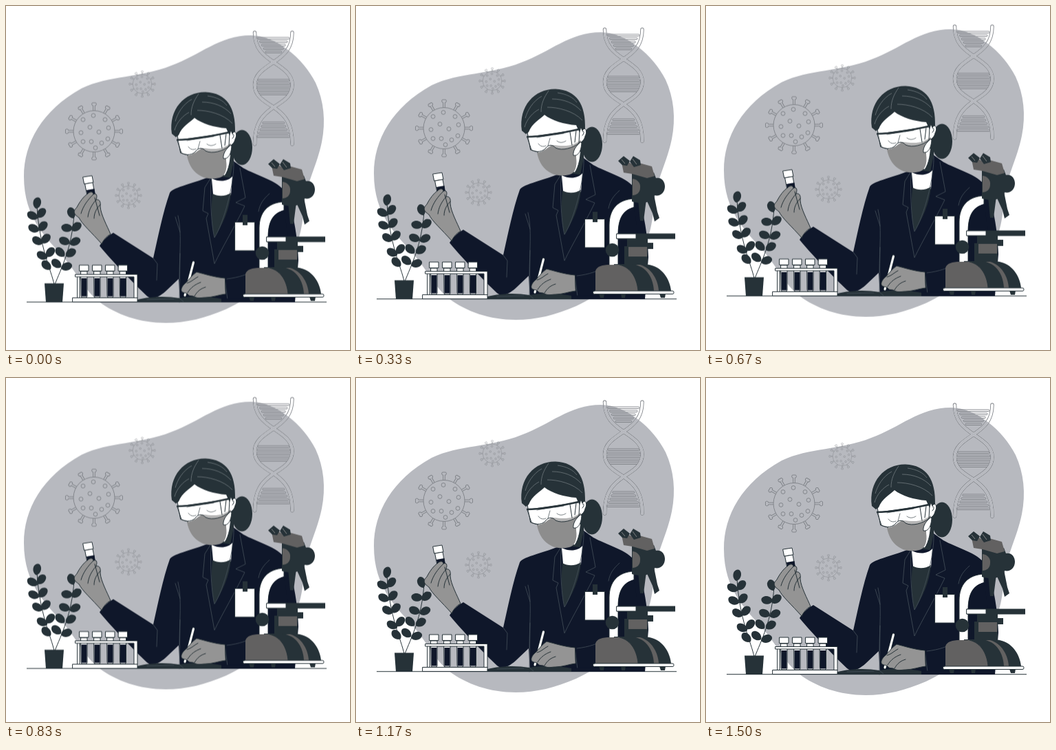
Animation of 500 by 500 pixels, one loop 1.54 s. Source, as an HTML page:

```html
<!DOCTYPE html>
<html lang="en">
<head>
<meta charset="utf-8">
<title>Laboratory</title>
<style>
  html, body { margin: 0; width: 100%; height: 100%; overflow: hidden; background: #fff; }
  svg { display: block; width: 100%; height: 100%; }
  #scene { animation: float 1540ms -5ms infinite; }
  /* Linear rise and fall of 10px, shown at 24 pictures a second */
  @keyframes float {
    0% { transform: translateY(-.4px); animation-timing-function: steps(17); }
    45.946% { transform: translateY(-9.83px); animation-timing-function: steps(1); }
    48.649% { transform: translateY(-9.61px); animation-timing-function: steps(17); }
    94.595% { transform: translateY(-.18px); animation-timing-function: steps(1); }
    97.297%, 100% { transform: translateY(0); }
  }
  .navy { fill: #0f172a; }
  .dark { fill: #263238; }
  .grey { fill: #949494; }
  .iron { fill: #626161; }
  .white { fill: #fff; }
  .ink { stroke: #263238; stroke-width: 1; stroke-linejoin: round; stroke-linecap: round; }
  .none { fill: none; }
  .seam { fill: none; stroke: #46515b; stroke-width: .8; stroke-linecap: round; stroke-linejoin: round; }
  .faint { fill: none; stroke: #7d8086; stroke-width: .9; }
  .faint * { vector-effect: non-scaling-stroke; }
  .strand { fill: none; stroke-linecap: round; }
</style>
</head>
<body>
<svg viewBox="0 0 500 500" preserveAspectRatio="none">
  <defs>
    <path id="blob" d="M26 248C26 200 52 152 110 120C150 101 195 105 240 87C282 72 310 43 356 43C392 43 432 76 450 112C462 138 465 168 459 198C452 232 438 255 434 285C431 310 431 335 415 360C395 395 355 425 320 441C290 454 262 461 232 461C195 461 160 449 135 430C115 414 104 390 85 367C60 338 26 310 26 248Z"/>
    <clipPath id="inside"><use href="#blob"/></clipPath>
    <g id="helix">
      <path d="M361.5 39C361.5 62 374 72 389 82C404 92 416 100 416 115C416 131 404 138 389 147.500C372 159 361.500 171 361.500 201"/>
      <path d="M416 39C416 62 404 72 389 82C374 92 361.500 100 361.500 115C361.500 131 374 138 389 147.500C406 159 416 171 416 201"/>
    </g>
    <path id="leaf" d="M0 0C2-5 8-7 13-5C18-2 18 3 13 5C8 7 2 5 0 0Z"/>
    <g id="virus"></g>
    <g id="tube">
      <path class="white ink" d="M2 386h9v36q0 2-2 2h-5q-2 0-2-2z"/>
      <path class="navy" d="M2.500 396h8v26.500h-8z"/>
      <path class="white ink" d="M0 377h13v8.500h-13z"/>
    </g>
  </defs>

  <g id="scene">
    <use href="#blob" fill="#b7b9bf"/>

    <g id="dna">
      <g id="rungs" class="faint"></g>
      <use href="#helix" class="strand" stroke="#7d8086" stroke-width="5.400"/>
      <use href="#helix" class="strand" stroke="#fff" stroke-width="3.700"/>
      <g clip-path="url(#inside)"><use href="#helix" class="strand" stroke="#b7b9bf" stroke-width="3.800"/></g>
    </g>

    <g class="faint">
      <use href="#virus" transform="translate(128 182.500)"/>
      <use href="#virus" transform="translate(198 113.800) scale(.46)"/>
      <use href="#virus" transform="translate(178 275.800) scale(.46)"/>
    </g>

    <g id="plant">
      <path class="none ink" d="M70 405C66 385 48 350 45 290M71 405C80 382 96 352 99 303"/>
      <g id="leaves" class="dark"></g>
      <path class="dark" d="M56 403.500H84L82 431H58Z"/>
    </g>

    <g id="woman">
      <ellipse class="dark" cx="343" cy="206" rx="15" ry="25.500"/>
      <path class="dark" d="M322 180L331 182V248C324 258 303 258 294 250Z"/>

      <path class="navy" d="M299 247C276 258 243 263 238 272C228 300 220 340 214 367L156 330C147 335 140 342 136 349C155 372 185 403 205 422C212 428 222 424 232 415L251 397L253 431H420L425 370C424 328 414 283 402 266C390 253 363 246 345 236L331 226L326 250Z"/>
      <path class="white" d="M299 251C311 257 323 255 329 248L327 275C318 278 307 278 301 274Z"/>
      <path class="dark" d="M300 273C309 278 319 277 327 272C325 296 314 320 303 337C298 318 298 292 300 273Z"/>
      <path class="seam" d="M299 248L289 264L286 298L294 302L291 309L303 375C315 350 333 320 347 291L334 286L348 279L340 236M331 228C332 257 317 315 303 337C298 318 296 270 299 248M252 397C252 360 256 330 250 305M252 431L253 360M214 367L220 375L219 399M383 273C374 281 369 288 367 299M246 307L253 329"/>

      <path class="white ink" d="M249 187C253 172 260 164 273 157L325 176L329 186C333 179 337 187 333 194C332 199 329 201 327 203C327 224 324 238 318 247L276 238L264 217L254 214Z"/>
      <path class="dark" d="M241 186C236 150 260 125 290 125.500C321 127 334 148 333 184L327 182L325 189L320 178C303 177 284 171 274 163C267 170 256 175 251 188L247 191Z"/>
      <path class="none" stroke="#7b8488" stroke-width=".7" d="M280 128C273 138 269 147 269 159M270 136C257 143 249 157 246 168M266 155C258 159 248 169 245 181M278 152C293 152 316 157 329 171M285 140C302 140 317 146 327 157M293 131C307 133 316 138 321 145"/>
      <path class="none ink" d="M329 187C332 186 332 190 329 193"/>

      <path class="none ink" d="M265 205C268 209 272 210 276 208M292 201C296 204 300 204 305 201M282 197L279 208M263 196L274 194M289 192L302 190"/>
      <path class="grey" style="fill:#8d8d8d" d="M263 218C274 217 279 209 286 207C297 208 307 209 316 206L327 200C328 212 319 216 320 225C322 239 318 248 310 250C302 252 291 252 284 248C272 242 266 232 263 218Z"/>
      <path class="white ink" d="M326 203C320 208 315 215 316 222C322 223 327 218 328 204Z" stroke-width=".6"/>
      <path class="ink" fill="#fff" fill-opacity=".35" d="M249 196L255 214C262 218 272 217 276 211C280 206 286 206 290 211C300 216 316 211 324 204L325 185Z"/>
      <path class="none" stroke="#263238" stroke-width="2.600" d="M248 195C273 195 302 189 326 183.500"/>
      <path class="none ink" d="M311 188L314 207M320 186L318 203"/>

      <path class="white ink" d="M112 249L125 247L127 257L114 259Z"/>
      <path class="white ink" d="M115 259L126 257L129 273L118 274Z"/>
      <path class="navy" d="M117 268L128.500 266L130 276L118 276Z"/>
      <path class="grey ink" stroke-width=".7" d="M139 346C124 329 111 318 106 308C97 302 98 298 103 293C107 285 113 277 119 273C123 269 127 271 127 274C132 272 133 276 131 282C136 281 138 285 137 292C138 304 147 320 152 332C146 335 142 340 139 346Z"/>
      <path class="none ink" d="M127 274C119 282 112 291 109 302M131 282C124 290 120 298 119 307M137 289C131 295 128 302 128 309M129 279L136 305"/>

      <path class="white ink" d="M333 314.500H361.500V356H333Z"/>
      <path class="dark" d="M344 304H351V319H344Z"/>

      <path class="dark" d="M184 429C203 423 229 421 252 425C279 420 307 424 340 431H184Z"/>
      <path class="seam" d="M252 425L258 430M205 427L244 426"/>
      <path class="navy" d="M317 397L350 389V431H317Z"/>
      <path class="seam" d="M318 397L322 427M321 397C339 395 353 390 361 384"/>
      <path class="none" stroke="#263238" stroke-width="4.500" stroke-linecap="round" d="M272.500 373L260 421"/>
      <path class="none" stroke="#fff" stroke-width="3" stroke-linecap="round" d="M272.500 373L260 421"/>
      <path class="grey ink" stroke-width=".7" d="M318 396C304 395 289 390 277 387C271 391 266 398 261 403C256 407 253 413 256 416C259 418 262 417 264 419C266 423 272 421 274 423C279 426 285 424 290 424C300 424 310 420 319 419Z"/>
      <path class="none ink" d="M263 403C269 402 273 397 279 394M264 417C269 409 275 405 283 402M274 422C278 415 283 411 290 409"/>
    </g>

    <g id="rack">
      <path class="white ink" d="M104 393H107V425H104Z"/>
      <use href="#tube" x="107"/><use href="#tube" x="126"/><use href="#tube" x="145"/><use href="#tube" x="163.500"/>
      <path class="white ink" d="M101 390.500H191V425H186V394H101Z"/>
      <path class="white ink" d="M97 424.500H191V430.500H97Z"/>
    </g>

    <path class="none" stroke="#263238" d="M30 430.700H466"/>

    <g id="microscope">
      <path class="navy" d="M313 425.500H420V431H313Z"/>
      <path class="white ink" d="M368 386V323C368 301 380 286 404 285V298C388 301 381 314 381 337V386Z"/>
      <path class="navy" d="M381 386V335C382 313 389 301 404 297L410 336V386Z"/>
      <circle class="dark" cx="372.500" cy="359.500" r="9.800"/>

      <path class="dark" d="M409 276L413 317H418L423 278ZM420 282L431 306L434 318L441 313L438 304L433 279Z"/>
      <path class="dark" d="M401 245L433 247L436 255C444 253 449 260 449 267C449 276 442 282 434 280C430 290 417 294 401 289Z"/>
      <path class="iron" d="M402 256C410 257 414 263 413 269C413 276 408 280 402 280Z"/>
      <path class="iron" d="M386 232L391 229L404 236L408 232L430 238L434 252L423 255L402 249L389 247Z"/>
      <path class="dark" d="M381 230L389 223L398 230L394 237L387 236ZM398 231L403 223L413 229L414 236L404 239Z"/>
      <path class="none" stroke="#9a9a9a" stroke-width=".8" d="M386 228L391 234M402 227L408 235"/>

      <path class="dark" d="M394 343H424V349H432V358H424V383H390V354H394Z"/>
      <path class="iron" d="M396 355H423V369H396Z"/>
      <path class="dark" d="M379 335.500H464V343.500H379Z"/>
      <path class="white ink" d="M379 336H407V343H379Z"/>

      <path class="dark" d="M390 381H425C444 383 456 401 458 419H390Z"/>
      <path class="iron" d="M390 381H413C430 386 439 403 440 419H390Z"/>
      <path class="dark" d="M375 380H400C424 382 432 402 433 419H370Z"/>
      <path class="iron" d="M348 419V390C350 383 358 381 369 381H383C401 385 409 403 410 419Z"/>
      <path class="none ink" d="M383 381C401 385 409 403 410 419M425 381C441 386 449 402 450 419"/>
      <path class="dark" d="M353 423H361L360 429H355ZM385 423H392L391 429H386ZM441 423H450L449 429H443Z"/>
      <rect class="white ink" x="344.500" y="419" width="117.500" height="4.500" rx="2"/>
    </g>
  </g>
</svg>
<script>
  const fill = (id, html) => { document.getElementById(id).innerHTML = html; };
  const range = n => [...Array(n).keys()];

  // Virus: ring, twelve knobbed spikes and scattered spots
  const spike = 'M-1.400-30V-37.500H-2.500Q-4.500-39.500-2.500-41.500H2.500Q4.500-39.500 2.500-37.500H1.400V-30';
  const spots = [[-16, -17], [-1, -23], [16, -17], [-6, -6], [7, 1], [21, -5], [-19, 2],
                 [20, 11], [-4, 15], [11, 17], [-16, 15], [2, 24]];
  fill('virus', '<circle r="30"/>' +
    range(12).map(i => `<path d="${spike}" transform="rotate(${i * 30})"/>`).join('') +
    spots.map(([x, y]) => `<circle cx="${x}" cy="${y}" r="2.900"/>`).join(''));

  // Bars of the double helix: first y, first half width, change per bar
  const bars = [[46, 23, -2.800], [107, 23, 0], [169, 16, 2]];
  fill('rungs', bars.map(([y, half, grow]) => range(5).map(i => {
    const w = half + grow * i + (grow ? 0 : 2 - Math.abs(i - 2));
    return `<rect x="${388.8 - w}" y="${y + i * 5}" width="${2 * w}" height="2.500" rx="1"/>`;
  }).join('')).join(''));

  // Leaves: stem point and direction
  const leaves = [
    [44, 295, -82], [46, 309, 207], [46, 308, -52], [48, 327, 203], [48, 327, -50],
    [53, 346, 210], [52, 345, -48], [60, 367, 207], [59, 365, -52], [65, 383, 222],
    [98, 309, 250], [97, 324, 187], [96, 327, -42], [93, 345, 200], [93, 347, -30],
    [85, 364, 222], [87, 364, -34], [80, 380, 218], [80, 382, -20]
  ];
  fill('leaves', leaves.map(([x, y, a]) =>
    `<use href="#leaf" transform="translate(${x} ${y}) rotate(${a})"/>`).join(''));
</script>
</body>
</html>
```
